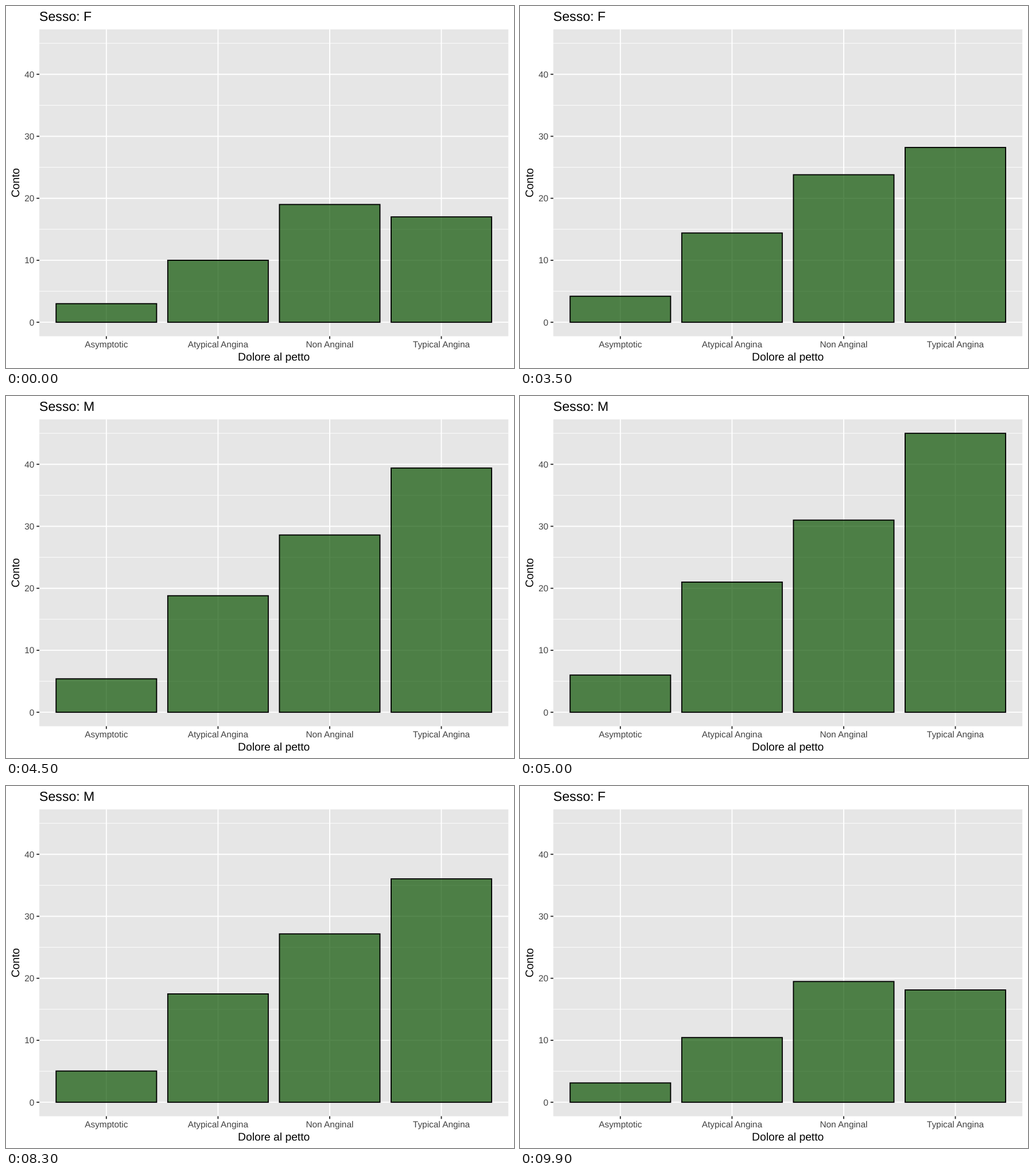
Animation, 885 px wide and 632 px high, one loop 10000 ms. Source, as an HTML page:

```html
<!DOCTYPE html>
<html lang="it">
<head>
<meta charset="utf-8">
<style>
  html, body { margin: 0; width: 100%; height: 100%; overflow: hidden; background: #fff; }
  svg { display: block; font-family: "Liberation Sans", Arial, sans-serif; text-rendering: geometricPrecision; }
</style>
</head>
<body>
<svg id="chart" width="885" height="632" viewBox="0 0 885 632"></svg>
<script>
const chart = document.getElementById("chart");
const labels = ["Asymptotic", "Atypical Angina", "Non Anginal", "Typical Angina"];
const female = [3, 10, 19, 17];
const male = [6, 21, 31, 45];

const left = 58.1, right = 875.2, top_ = 40.8, bottom = 576.5;
const slot = (right - left) / 4.2;
const unit = (bottom - top_) / 49.5;
const xAt = i => left + slot * (0.6 + i);
const yAt = v => bottom - unit * (2.25 + v);

function add(tag, attrs, text = "") {
  const el = document.createElementNS("http://www.w3.org/2000/svg", tag);
  for (const key in attrs) el.setAttribute(key, attrs[key]);
  el.textContent = text;
  return chart.appendChild(el);
}
const line = (x1, y1, x2, y2, stroke, width) =>
  add("line", { x1, y1, x2, y2, stroke, "stroke-width": width });
const label = (text, x, y, size, fill, anchor, extra) =>
  add("text", { x, y, "font-size": size, fill, "text-anchor": anchor, ...extra }, text);

add("rect", { x: left, y: top_, width: right - left, height: bottom - top_, fill: "#e6e6e6" });

// Grid: minor lines below major ones
for (let v = 5; v <= 45; v += 10) line(left, yAt(v), right, yAt(v), "#fff", 0.93);
for (let v = 0; v <= 40; v += 10) line(left, yAt(v), right, yAt(v), "#fff", 1.87);
labels.forEach((_, i) => line(xAt(i), top_, xAt(i), bottom, "#fff", 1.87));

const bars = labels.map((_, i) => add("rect", {
  x: xAt(i) - slot * 0.45, width: slot * 0.9,
  fill: "rgba(13,84,3,.7)", stroke: "#000", "stroke-width": 1.87
}));

// Axes
for (let v = 0; v <= 40; v += 10) {
  line(left - 4.8, yAt(v), left, yAt(v), "#2b2b2b", 1.87);
  label(v, left - 8.7, yAt(v) + 5.5, 15.4, "#424242", "end");
}
labels.forEach((name, i) => {
  line(xAt(i), bottom, xAt(i), bottom + 4.8, "#2b2b2b", 1.87);
  label(name, xAt(i), 596.4, 15.4, "#424242", "middle");
});
const midX = (left + right) / 2, midY = (top_ + bottom) / 2;
label("Dolore al petto", midX, 618.6, 19.25, "#000", "middle");
label("Conto", 0, 0, 19.25, "#000", "middle", { transform: `translate(23.4 ${midY}) rotate(-90)` });
const title = label("", left, 26.3, 23.1, "#000", "start");

// Progress from female (0) to male (25) in steps of 100 ms, then back
function draw(now) {
  const tick = Math.floor((now % 10000) / 100);
  const ramp = start => Math.min(25, Math.max(0, tick - start));
  const step = ramp(25) - ramp(75);
  bars.forEach((bar, i) => {
    const value = female[i] + (male[i] - female[i]) * step / 25;
    bar.setAttribute("y", yAt(value));
    bar.setAttribute("height", unit * value);
  });
  const showMale = tick < 75 ? step > 12 : step > 12;
  title.textContent = "Sesso: " + (showMale ? "M" : "F");
}

let begin;
function loop(now) {
  begin ??= now;
  draw(now - begin);
  requestAnimationFrame(loop);
}
draw(0);
requestAnimationFrame(loop);
</script>
</body>
</html>
```
